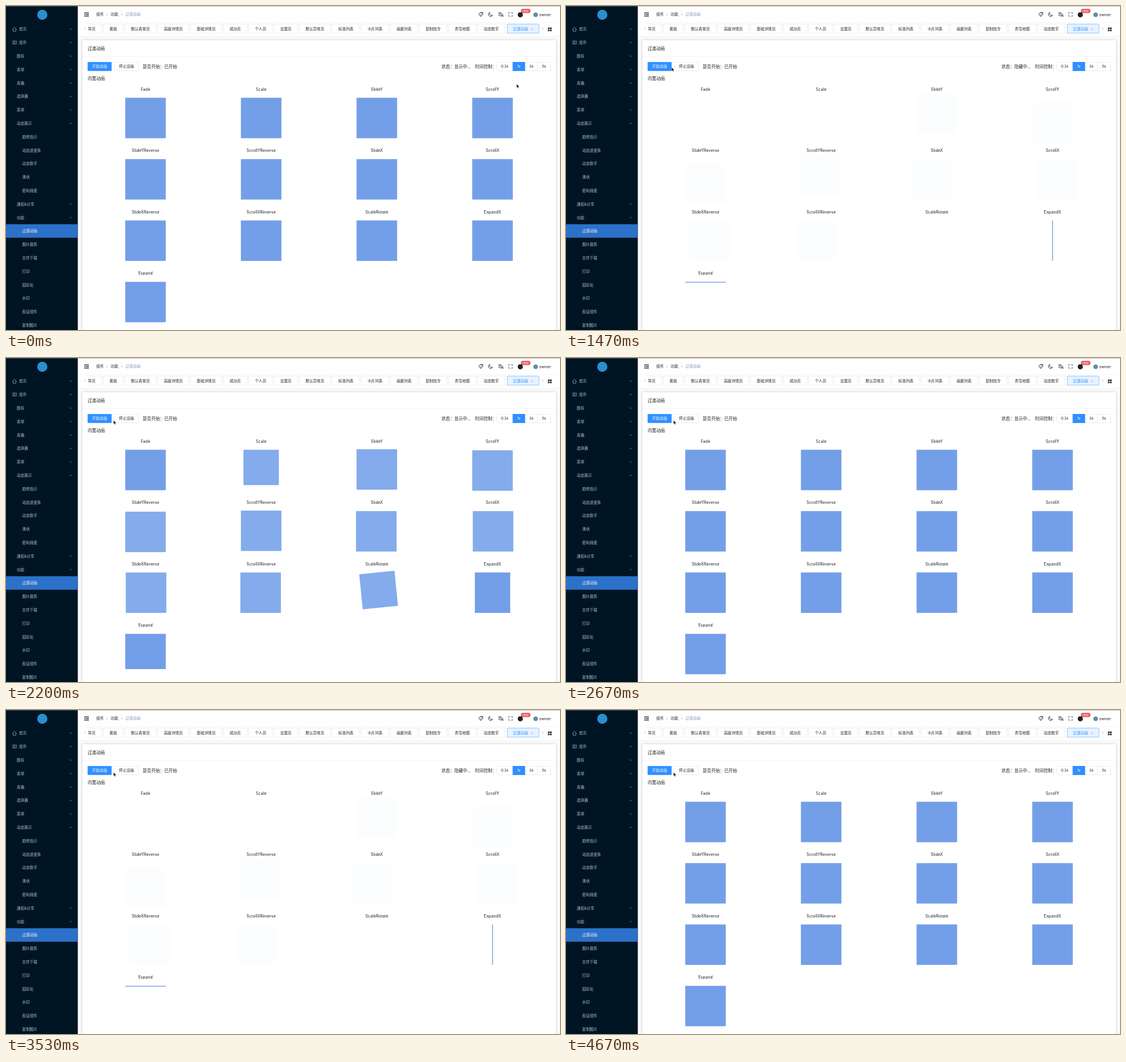
An HTML page for the animation above (4.73 s loop, 977 by 573 pixels).

```html
<!DOCTYPE html>
<html lang="zh-CN">
<head>
<meta charset="utf-8">
<title>过渡动画</title>
<style>
html, body { margin: 0; width: 100%; height: 100%; overflow: hidden; background: #fff; }
svg { display: block; font-family: Inter, "Noto Sans CJK SC", "Noto Sans CJK", sans-serif; }
.card { filter: drop-shadow(0 0 2px #0003); }
</style>
</head>
<body>
<svg id="stage" width="977" height="573" viewBox="0 0 977 573"></svg>
<script>
const stage = document.getElementById('stage');
const INK = '#222', LINE = '#d9d9d9', BLUE = '#2e8fff', BOX = '#739fe9';

function add(tag, attrs, parent = stage) {
  const el = document.createElementNS('http://www.w3.org/2000/svg', tag);
  for (const key in attrs) el.setAttribute(key, attrs[key]);
  return parent.appendChild(el);
}
const rect = (x, y, width, height, fill, more) => add('rect', { x, y, width, height, fill, ...more });
const circle = (cx, cy, r, fill) => add('circle', { cx, cy, r, fill });
const line = (d, stroke = INK, width = 0.8) => add('path', { d, stroke, fill: 'none', 'stroke-width': width });
const framed = (x, y, w, h, fill = '#fff', stroke = LINE) =>
  rect(x, y, w, h, fill, { rx: 1, stroke, 'stroke-width': 0.5 });

// y is the vertical middle of the text
function text(x, y, content, { size = 6.67, fill = INK, anchor = 'start' } = {}) {
  const el = add('text', { x, y: y + size * 0.37, 'font-size': size, fill, 'text-anchor': anchor });
  el.textContent = content;
  return el;
}

function drawSidebar() {
  rect(0, 0, 126.6, 573, '#001524');
  circle(64, 15.5, 9, '#2a8fd0');
  // level, label, chevron direction
  const menu = `0首页v 0组件^ 1图标v 1表单v 1表格v 1选择器v 1菜单v 1动态展示^ 2趋势指示 2动态进度条 2动态数字 2滑块
    2密码强度 1通知&分享v 1功能^ 2过渡动画 2图片裁剪 2文件下载 2打印 2国际化 2水印 2验证组件 2复制图片`.split(/\s+/);
  menu.forEach((item, i) => {
    const y = 41 + i * 23.8, active = i === 15;
    const [, level, label, arrow] = item.match(/(\d)([^v^]+)(.?)/);
    if (active) rect(0, y - 12, 126.6, 23.8, '#2b71c8');
    text([23, 19, 28.5][level], y, label, { fill: active ? '#fff' : '#b9c0c5' });
    if (arrow) {
      const d = arrow === 'v' ? 1 : -1;
      line(`M112.2 ${y - d}l2 ${2 * d} 2 ${-2 * d}`, '#8d979e', 0.7);
    }
  });
  line('M11.5 41.2L15 37.8l3.5 3.4M12.5 40.5v4h5v-4', '#b9c0c5', 0.7);
  line('M12 61.8h6.6v5.6H12zM14 61.8v5.6M15.4 63.8h2M15.4 65.5h2', '#b9c0c5', 0.6);
}

function drawHeader() {
  rect(126.6, 0, 850.4, 53.5, '#fff');
  line('M126.6 29.3H977M126.6 53.6H977', '#eee', 0.6);
  line('M137.8 12.2h8.4M140.5 15h5.7M137.8 17.8h8.4', INK, 1.3);
  line('M140 13.6l-2 1.4 2 1.4', INK, 0.7);
  text(159, 15, '组件');
  text(184.5, 15, '功能');
  text(210.5, 15, '过渡动画', { fill: '#8496b0' });
  line('M177.3 13l2 2-2 2M203.3 13l2 2-2 2', '#999', 0.6);

  line('M833.8 14l3-3 4.2 3.6-3.7 4.2zM837 11.2l3.8-.2v3.5M836 14.5l2.5 2', INK, 0.9);
  line('M853 11.3a3.8 3.8 0 1 0 5 5.2a4 4 0 0 1-5-5.2z', INK, 0.9);
  line('M868 12.3h6M871 10.8v1.5M873 12.3q-1 3.5-4.8 5M869.3 13.5q1 2.5 3.5 3.7M872.8 19.2l2.3-5.5 2.3 5.5M873.6 17.6h3', INK, 0.8);
  line('M886.5 13.5v-1.8h1.8M891.2 11.7h1.8v1.8M893 16.3v1.8h-1.8M888.3 18.1h-1.8v-1.8', INK, 0.8);
  circle(907, 15.5, 4.6, '#222');
  rect(908, 5, 17, 7.6, '#ee5354', { rx: 3.8 });
  text(916.5, 8.8, 'new', { size: 5.6, fill: '#fff', anchor: 'middle' });
  line('M924.5 13v6', '#ddd', 0.5);
  circle(934, 15.5, 4, '#6f8799');
  text(940, 15, 'owner', { size: 7.2 });
}

function drawTabs() {
  framed(132, 32, 36.8, 16);
  text(144.5, 40.4, '导页');
  rect(127, 31, 17, 18, '#fff');
  let x = 171.5;
  for (const name of '看板 默认表单页 高级详情页 基础详情页 成功页 个人页 设置页 默认异常页 标准列表 卡片列表 画廊列表 复制指令 青穹地图 动态数字'.split(' ')) {
    const width = name.length * 6.67 + 22;
    framed(x, 32, width, 16);
    text(x + width / 2, 40.4, name, { anchor: 'middle' });
    x += width + 2.6;
  }
  framed(884, 32, 56, 16, '#e6f3ff', BLUE);
  text(894, 40.4, '过渡动画', { fill: BLUE });
  line('M926 39.2l3 3m0-3l-3 3', BLUE, 0.5);
  line('M139.8 37.8l-2 2.2 2 2.2M945.8 37.8l2 2.2-2 2.2', '#999', 0.6);
  for (const [dx, dy] of [[0, 0], [3.7, 0], [0, 3.7], [3.7, 3.7]]) rect(955.7 + dx, 38 + dy, 2.8, 2.8, INK);
}

rect(126.6, 53, 851, 520, '#fafafa');
rect(134.8, 60.5, 835, 520, '#fff', { class: 'card' });
line('M134.8 89.6H969.8', '#eee', 0.7);
drawHeader();
drawTabs();
drawSidebar();
line('M0 .3H977', '#888', 0.6);

const big = { size: 7.6 };
text(144, 75.5, '过渡动画', big);
framed(144.2, 99.3, 41.8, 15.4, BLUE, BLUE);
text(165.1, 107, '开始动画', { fill: '#fff', anchor: 'middle' });
const stopFrame = framed(191.7, 99.3, 41.8, 15.4);
const stopLabel = text(212.6, 107, '停止动画', { anchor: 'middle' });
text(241, 107.2, '是否开始：已开始', big);
text(768, 107.2, '状态：', big);
const status = text(790.7, 107.2, '', big);
text(827, 107.2, '时间控制：', big);
framed(865.6, 99.3, 94.6, 15.4);
rect(893.5, 99, 22, 16, BLUE);
line('M937.6 99.3v15.4', LINE, 0.5);
[['0.3s', 879.5], ['1s', 904.5], ['3s', 926.5], ['5s', 948.8]].forEach(([label, x], i) =>
  text(x, 107, label, { size: 6.5, fill: i === 1 ? '#fff' : INK, anchor: 'middle' }));
text(144, 128.5, '内置动画', big);

function bezier(x1, y1, x2, y2) {
  const at = (a, b, s) => 3 * a * s * (1 - s) ** 2 + 3 * b * s * s * (1 - s) + s ** 3;
  return x => {
    if (x <= 0 || x >= 1) return x <= 0 ? 0 : 1;
    let lo = 0, hi = 1;
    for (let i = 0; i < 24; i++) {
      const mid = (lo + hi) / 2;
      if (at(x1, x2, mid) < x) lo = mid; else hi = mid;
    }
    return at(y1, y2, lo);
  };
}
const swift = bezier(0.25, 0.8, 0.5, 1), easeInOut = bezier(0.42, 0, 0.58, 1);

// Each effect maps visibility v (0 hidden, 1 shown) to attributes
const SIDE = 71.5, SHIFT = 7.5;
const shift = (dx, dy) => v => ({
  opacity: v, transform: `translate(${dx * SHIFT * (1 - v)} ${dy * SHIFT * (1 - v)})`
});
const effects = {
  Fade: (v, fade) => ({ opacity: fade }),
  Scale: v => ({ opacity: v, transform: `scale(${v})` }),
  SlideY: shift(0, -1),
  ScrollY: shift(0, 1),
  SlideYReverse: shift(0, 1),
  ScrollYReverse: shift(0, -1),
  SlideX: shift(-1, 0),
  ScrollX: shift(1, 0),
  SlideXReverse: shift(1, 0),
  ScrollXReverse: shift(-1, 0),
  ScaleRotate: v => ({ opacity: v, transform: `scale(${v}) rotate(${-45 * (1 - v)})` }),
  ExpandX: v => ({ x: -SIDE * v / 2, width: SIDE * v }),
  Expand: v => ({ height: SIDE * v })
};
const boxes = Object.entries(effects).map(([name, effect], i) => {
  const x = 246 + (i % 4) * 204, y = 162.3 + Math.floor(i / 4) * 108.5;
  text(x, y - 15, name, { size: 7.2, anchor: 'middle' });
  const holder = add('g', { transform: `translate(${x} ${y})` });
  const el = add('rect', { x: -SIDE / 2, width: SIDE, height: SIDE, fill: BOX }, holder);
  return { el, effect };
});

const cursor = add('path', {
  d: 'M0 0V6.6L1.5 5.3 2.6 7.7 3.7 7.2 2.7 4.9H4.7Z', fill: '#000', stroke: '#fff', 'stroke-width': 0.4
});
// time, x, y
const cursorPath = [
  [67, 900.5, 138], [330, 587, 111], [467, 587, 111], [800, 312.5, 108.5],
  [1000, 187, 107.5], [1130, 186.3, 108.5], [1600, 186.3, 108.5], [1733, 189.7, 110.3]
];
function cursorAt(t) {
  const i = cursorPath.findIndex(p => p[0] > t);
  if (i < 1) return cursorPath.at(i).slice(1);
  const [a, b] = [cursorPath[i - 1], cursorPath[i]];
  const k = (t - a[0]) / (b[0] - a[0]);
  return [a[1] + (b[1] - a[1]) * k, a[2] + (b[2] - a[2]) * k];
}

const LOOP = 4730, STEP = 1000 / 15, FIRST_TOGGLE = 704, DURATION = 1000, FADE = 200;

function render(time) {
  const t = Math.min(Math.floor((time % LOOP + 0.5) / STEP), 70) * STEP;
  const phase = Math.floor((t - FIRST_TOGGLE) / DURATION);
  const elapsed = t - FIRST_TOGGLE - phase * DURATION;
  const hiding = phase >= 0 && phase % 2 === 0;
  const progress = phase < 0 ? 1 : swift(elapsed / DURATION);
  const faded = phase < 0 ? 1 : easeInOut(elapsed / FADE);
  const v = hiding ? 1 - progress : progress;
  const fade = hiding ? 1 - faded : faded;
  for (const { el, effect } of boxes) {
    const attrs = effect(v, fade);
    for (const key in attrs) el.setAttribute(key, attrs[key]);
  }
  status.textContent = hiding ? '隐藏中...' : '显示中...';

  const [x, y] = cursorAt(t);
  cursor.setAttribute('transform', `translate(${x} ${y})`);
  const hover = x > 191.7 && x < 233.5;
  stopFrame.setAttribute('stroke', hover ? BLUE : LINE);
  stopLabel.setAttribute('fill', hover ? BLUE : INK);
}

const start = performance.now();
function tick() {
  render(performance.now() - start);
  requestAnimationFrame(tick);
}
tick();
</script>
</body>
</html>
```
